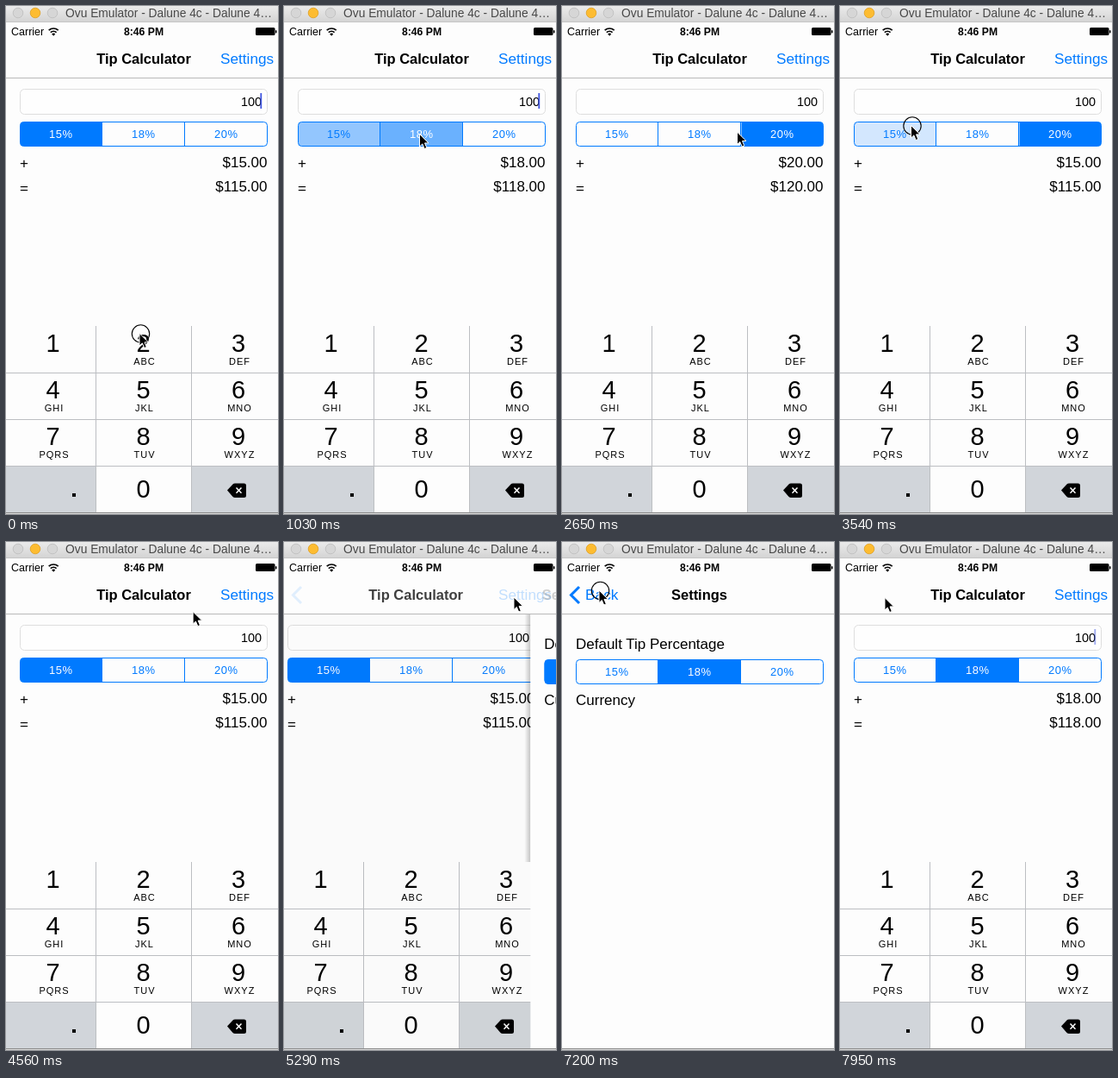
An HTML page for the animation above (8 s loop, 316 px wide and 589 px high).

```html
<!DOCTYPE html>
<html lang="en">
<head>
<meta charset="utf-8">
<title>Tip Calculator</title>
<style>
html, body { margin: 0; width: 100%; height: 100%; overflow: hidden; background: #fdfdfd; }
svg { display: block; width: 316px; height: 589px; font-family: "Liberation Sans", Arial, sans-serif; }
text { white-space: pre; }
.mid { text-anchor: middle; }
.end { text-anchor: end; }
.body { font-size: 17px; }
.title { font-size: 16.5px; font-weight: bold; }
.blue { fill: #007aff; }
.seg text { font-size: 13px; letter-spacing: .5px; text-anchor: middle; }
</style>
</head>
<body>
<svg viewBox="0 0 316 589">
  <defs>
    <linearGradient id="chrome" x2="0" y2="1">
      <stop stop-color="#ebebeb"/><stop offset="1" stop-color="#d3d3d3"/>
    </linearGradient>
    <linearGradient id="shade">
      <stop stop-opacity="0"/><stop offset="1" stop-opacity=".22"/>
    </linearGradient>
  </defs>
  <rect width="316" height="589" fill="#fdfdfd"/>

  <g id="tipPage">
    <rect x="16.5" y="96.5" width="287" height="29" rx="5" fill="#fefefe" stroke="#dedede"/>
    <text class="end" x="297" y="116" font-size="14.4">100</text>
    <rect id="caret" x="295.4" y="101" width="1.8" height="18" fill="#3f55e0"/>
    <g id="tipSeg" class="seg" transform="translate(16 134)"></g>
    <g class="body">
      <text x="16" y="188">+</text><text x="16" y="217">=</text>
      <text id="tip" class="end" x="303.5" y="187"></text>
      <text id="total" class="end" x="303.5" y="215"></text>
    </g>
    <g id="pad"></g>
  </g>
  <rect id="dim" y="84" width="316" height="503" opacity="0"/>

  <g id="setPage">
    <rect x="-7" y="84" width="7" height="287" fill="url(#shade)"/>
    <rect y="84" width="316" height="503" fill="#fdfdfd"/>
    <g class="body">
      <text x="16" y="124">Default Tip Percentage</text>
      <text x="16" y="189">Currency</text>
    </g>
    <g id="setSeg" class="seg" transform="translate(16 136)"></g>
  </g>

  <rect y="19" width="316" height="64" fill="#fdfdfd"/>
  <rect y="83" width="316" height="1" fill="#b9b9b9"/>
  <text id="tipTitle" class="title mid" x="160" y="67">Tip Calculator</text>
  <text id="setBtn" class="blue" x="249" y="67" font-size="17.2">Settings</text>
  <text id="setTitle" class="title mid" x="159.5" y="67">Settings</text>
  <path id="chevron" d="M20 52L10.5 61.5L20 71" fill="none" stroke="#007aff" stroke-width="3"/>
  <text id="back" class="blue" x="27" y="67" font-size="17.3">Back</text>

  <text x="6" y="34" font-size="12.5">Carrier</text>
  <path d="M49.7 28.2a8 8 0 0 1 11 0M51.8 30.6a5 5 0 0 1 6.8 0" fill="none" stroke="#000" stroke-width="1.7"/>
  <path d="M53.2 32.4a3 3 0 0 1 4 0l-2 2.3z"/>
  <text class="mid" x="160" y="34" font-size="12.2" font-weight="bold">8:46 PM</text>
  <rect x="290" y="25" width="22.5" height="9" rx="1.5"/>
  <rect x="313" y="28" width="1.5" height="3.5" rx=".7"/>

  <rect width="316" height="19" fill="url(#chrome)"/>
  <rect y="18" width="316" height="1" fill="#c6c6c6"/>
  <g stroke-width=".8">
    <circle cx="14" cy="8" r="5.8" fill="#d6d6d6" stroke="#bdbdbd"/>
    <circle cx="34" cy="8" r="5.8" fill="#fdbc31" stroke="#dfa023"/>
    <circle cx="54" cy="8" r="5.8" fill="#d6d6d6" stroke="#bdbdbd"/>
  </g>
  <text x="69" y="13" font-size="13.8" fill="#484848">Ovu Emulator - Dalune 4c - Dalune 4…</text>
  <rect y="587" width="316" height="2" fill="#d8d8d8"/>
  <rect y="587" width="316" height="1" fill="#8c8c8c"/>

  <g id="pointer">
    <circle id="ring" r="10.2" fill="none" stroke="#000" stroke-width="1.1"/>
    <path transform="translate(-1.5 -.5)" d="M0 0V14.5L3.3 11.4L5.7 17L8.3 15.9L6 10.4H10.5Z" stroke="#fff" stroke-width="1"/>
  </g>
</svg>
<script>
const LOOP = 8000, RATES = [15, 18, 20];
const $ = id => document.getElementById(id);
const clamp = v => Math.max(0, Math.min(1, v));
const smooth = v => (v = clamp(v), v * v * (3 - 2 * v));
const money = n => '$' + n.toFixed(2);
const move = (id, x, y = 0) => $(id).setAttribute('transform', `translate(${x} ${y})`);
const fade = (id, a) => $(id).setAttribute('opacity', a);

// [time, chosen segment]
const tipPicks = [[-900, 0], [950, 1], [2150, 2], [3610, 0], [6800, 1]];
const setPicks = [[-900, 0], [6430, 1]];
// [time, x, y]
const path = [
  [0, 156.5, 380], [150, 156.5, 380], [680, 159, 149], [1250, 159, 149],
  [1750, 259, 150], [2300, 259, 150], [3250, 84, 139], [4000, 84, 139],
  [4850, 268, 60], [5150, 268, 60], [5280, 268.5, 64.5], [5480, 268.5, 64.5],
  [6000, 156.5, 149], [6450, 156.5, 149], [6900, 44.5, 56.5],
  [7400, 44.5, 56.5], [7900, 53.5, 65], [LOOP, 53.5, 65]
];
const taps = [[0, 150], [740, 930], [1850, 2050], [3380, 3670], [4940, 5180], [6150, 6400], [7190, 7345]];

function buildSeg(id) {
  const edge = 'M4.5 .5H95.5V28.5H4.5a4 4 0 0 1-4-4V4.5a4 4 0 0 1 4-4z';
  const shapes = [`<path d="${edge}"/>`, '<rect x="95.5" y=".5" width="96" height="28"/>',
    `<path d="${edge}" transform="matrix(-1 0 0 1 288 0)"/>`];
  $(id).innerHTML = `<g class="blue">${shapes.join('')}</g>` +
    '<path d="M95.5 0V29M191.5 0V29" stroke="#007aff"/>' +
    '<rect x=".5" y=".5" width="287" height="28" rx="4" fill="none" stroke="#007aff"/>' +
    RATES.map((r, i) => `<text x="${47.7 + 96 * i}" y="19.3">${r}%</text>`).join('');
}

function buildPad() {
  const letters = ['', 'ABC', 'DEF', 'GHI', 'JKL', 'MNO', 'PQRS', 'TUV', 'WXYZ'];
  const cols = [54.5, 159.5, 270];
  const digit = (n, x, y) => `<text class="mid" x="${x}" y="${y}" font-size="29">${n}</text>`;
  let s = '<path d="M0 533H104V587H0zM215 533H332V587H215z" fill="#d1d5da"/>' +
    '<path d="M0 425.5H332M0 479.5H332M0 533.5H332M104.5 371V587M215.5 371V587" stroke="#bcbec2"/>';
  letters.forEach((w, i) => {
    const x = cols[i % 3], y = 401 + 54 * Math.floor(i / 3);
    s += digit(i + 1, x, y) +
      `<text class="mid" x="${x + 1.5}" y="${y + 15}" font-size="11" letter-spacing="1">${w}</text>`;
  });
  s += digit(0, 159.5, 570) + '<rect x="77" y="565" width="4" height="4"/>' +
    '<path d="M257 561.5L263.5 554.5Q264.5 553.5 266 553.5H276.5Q279 553.5 279 556V567.5Q279 570 276.5 570H266Q264.5 570 263.5 569z"/>' +
    '<path d="M267.5 558.5L273.5 564.8M273.5 558.5L267.5 564.8" stroke="#fff" stroke-width="1.5"/>';
  $('pad').innerHTML = s;
}

const current = (picks, t) => picks.filter(p => p[0] <= t).length - 1;

function drawSeg(id, picks, t) {
  const n = current(picks, t), [at, now] = picks[n];
  const prev = n ? picks[n - 1][1] : now, next = picks[n + 1];
  const k = clamp((t - at) / 140);
  const fills = $(id).firstChild.children, labels = $(id).querySelectorAll('text');
  RATES.forEach((_, i) => {
    let a = i === now ? Math.max(.17, k) : i === prev ? 1 - k : 0;
    if (next && i === next[1] && t > next[0] - 260) a = .17;
    fills[i].setAttribute('opacity', a);
    labels[i].setAttribute('fill', a > .5 ? '#fff' : '#007aff');
  });
}

function pointerAt(t) {
  const i = path.findIndex(k => k[0] > t), [t0, x0, y0] = path[i - 1], [t1, x1, y1] = path[i];
  const k = smooth((t - t0) / (t1 - t0));
  return [x0 + (x1 - x0) * k, y0 + (y1 - y0) * k];
}

function draw(ms) {
  const t = ms % LOOP;
  const p = smooth((t - 5186) / 500) - smooth((t - 7300) / 500);

  drawSeg('tipSeg', tipPicks, t);
  drawSeg('setSeg', setPicks, t);
  const rate = RATES[tipPicks[current(tipPicks, t + 110)][1]];
  $('tip').textContent = money(rate);
  $('total').textContent = money(100 + rate);

  const gap = Math.abs((t + 525) % 1000 - 500);
  fade('caret', t > 7300 ? clamp((t - 7850) / 200) : clamp((300 - gap) / 80));

  move('tipPage', -p * 316 / 3);
  move('setPage', 324 * (1 - p) - 8 * (1 - p) * p);
  fade('setPage', p > 0 ? 1 : 0);
  fade('dim', p * .1);

  move('tipTitle', -60 * p);
  fade('tipTitle', clamp(1 - 2.2 * p));
  fade('setBtn', clamp(1 - 2 * p) * (t > 4950 && t < 5700 ? .3 : 1));
  move('setTitle', 195 * (1 - p));
  fade('setTitle', clamp(p * 1.5));
  fade('chevron', p);
  move('back', 60 * (1 - p));
  fade('back', clamp(2 * p - 1));

  move('pointer', ...pointerAt(t));
  fade('ring', taps.some(([a, b]) => t >= a && t < b) ? 1 : 0);
}

['tipSeg', 'setSeg'].forEach(buildSeg);
buildPad();
function tick(now) {
  draw(now);
  requestAnimationFrame(tick);
}
draw(0);
requestAnimationFrame(tick);
</script>
</body>
</html>
```
